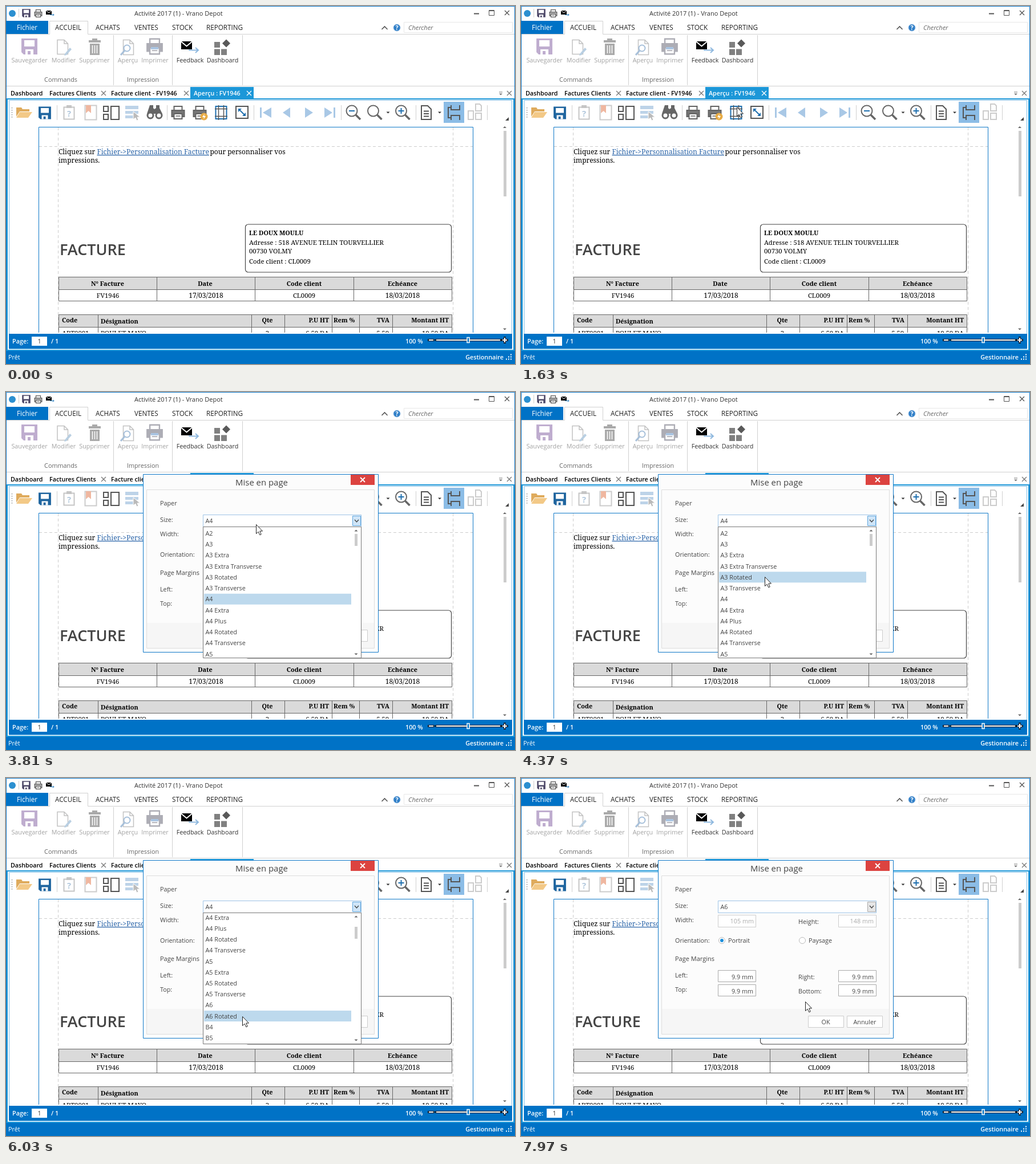
These frames come from a looping animation (892x628 px, 8 s). An HTML page:

```html
<!DOCTYPE html>
<html lang="fr">
<head>
<meta charset="utf-8">
<title>Mise en page</title>
<style>
html, body { margin: 0; width: 100%; height: 100%; overflow: hidden; background: #fff; }
svg { display: block; width: 100%; height: 100%; }
text { font: 10.8px "Open Sans", sans-serif; fill: #333; white-space: pre; }
.tab text { font-size: 11.7px; fill: #222; }
.doc text { font-size: 10.7px; font-weight: 600; fill: #000; }
.off text { fill: #a3a3a3; }
.mid text, text.mid { text-anchor: middle; }
.end text, text.end { text-anchor: end; }
.inv text { fill: #fff; }
.inv .b { font-weight: 600; }
.serif text { font-family: "Noto Serif", serif; font-size: 11.3px; fill: #000; }
.serif .big { font-size: 12px; }
.serif .b text, .serif text.b { font-weight: 700; font-size: 10.9px; }
.dlg text { fill: #444; }
.dlg .dim { fill: #aaa; }
.line { fill: none; stroke: #d0d0d0; }
.dk { fill: none; stroke: #555; stroke-width: 2; }
.bl { fill: none; stroke: #1f6fae; stroke-width: 2; }
.box { fill: #fff; stroke: #bbb; }
</style>
</head>
<body>
<svg viewBox="0 0 892 628">
<defs>
  <clipPath id="view"><rect x="6" y="211" width="863" height="362"/></clipPath>
  <clipPath id="listClip"><rect x="346" y="238" width="276" height="228"/></clipPath>
  <path id="x" d="M-4-4 4 4M4-4-4 4" fill="none"/>
  <path id="down" d="M-3-1.5H3L0 1.5Z"/>
  <g id="floppy"><path d="M-14-14H14V14H-10L-14 10Z"/><path d="M-9-11H9V0H-9ZM-7 5H7V14H2V8H-3V14H-7Z" fill="#fff"/></g>
  <g id="printer" stroke-width="2"><path d="M-7-4V-11H7V-4" fill="#fff"/><path d="M-11-4H11V7H-11Z"/><path d="M-7 2H7V11H-7Z" fill="#fff"/><path d="M-4 6H4" stroke-width="1.500"/></g>
  <g id="lens"><circle r="9.500" fill="#fff"/><path d="M7 7 15 15" stroke-width="3.500"/></g>
  <path id="zoom" d="M741 586H749M754 586H866M870 586H878M874 582V590" fill="none"/>
</defs>
<path d="M.5 628V.5H891.500V628" fill="#fff" stroke="#0f78c8"/>

<!-- title bar -->
<circle cx="11" cy="13" r="6" fill="#2b8fd0"/>
<path class="line" d="M22.500 5V20" stroke="#999"/>
<use href="#floppy" transform="translate(35.500 12.500) scale(.52)" fill="#4d4868"/>
<use href="#printer" transform="translate(56.500 13) scale(.58)" stroke="#555" fill="#bbb"/>
<path d="M70 8H80V15H70Z"/><path d="M70 8 75 12 80 8" fill="none" stroke="#fff"/><path d="M77 15.500H84M82 13.500 84 15.500 82 17.500" fill="none" stroke="#2b7fc0"/>
<text x="225" y="16.500" style="font-size:11px">Activité 2017 (1) - Vrano Depot</text>
<g fill="none" stroke="#555"><path d="M820 13.500H829" stroke-width="2"/><path d="M846.500 7.500H855.500V16.500H846.500Z M846 8.500H856"/><use href="#x" x="878" y="12" stroke-width="1.400"/></g>

<!-- ribbon -->
<path d="M0 26H74V49H0Z" fill="#0072c6"/>
<path class="line" d="M1 49.500H76.500V26.500H143.500V49.500H891M1 140.500H891M188.500 51V139M291.500 51V139M414.500 51V139"/>
<g class="tab"><text x="19" y="42" style="fill:#fff">Fichier</text><text x="86" y="42">ACCUEIL</text><text x="157" y="42">ACHATS</text><text x="225" y="42">VENTES</text><text x="291" y="42">STOCK</text><text x="351" y="42">REPORTING</text></g>
<path d="M658.500 41 663.500 36 668.500 41" fill="none" stroke="#555" stroke-width="1.600"/>
<circle cx="685" cy="38" r="6" fill="#2f7fc8" stroke="#9cc0e4"/><text class="mid" x="685" y="42" style="fill:#fff;font-weight:700">?</text>
<path d="M697.500 28.500H887.500V46.500H697.500Z" fill="none" stroke="#e8e8e8"/>
<text x="705" y="42" style="font-style:italic;font-size:11px;fill:#666">Chercher</text>
<g class="mid off">
  <text x="41" y="99">Sauvegarder</text><text x="101" y="99">Modifier</text><text x="155" y="99">Supprimer</text><text x="213.500" y="99">Aperçu</text><text x="261" y="99">Imprimer</text>
</g>
<g class="mid"><text x="322.500" y="99">Feedback</text><text x="379.500" y="99">Dashboard</text><text x="96" y="133" style="fill:#666">Commands</text><text x="240" y="133" style="fill:#666">Impression</text></g>
<use href="#floppy" x="41" y="71" fill="#bfadcf"/>
<path d="M90 59.500H102L108.500 66V84.500H90Z M102 60V66H108" fill="#fff" stroke="#c2c2c2" stroke-width="1.500"/><path d="M103 84 112 73 115 76 106 86 102 87Z" fill="#b9cfe2"/>
<path d="M145 60H166V64H145ZM151 57H160V60H151ZM147 66H164V86H147Z" fill="#aaa"/><path d="M151.500 69V83M155.500 69V83M159.500 69V83" stroke="#fff" stroke-width="1.500"/>
<path d="M205.500 59.500H217L223.500 66V85.500H205.500Z M217 60V66H223" fill="#fff" stroke="#c2c2c2" stroke-width="1.500"/><circle cx="212" cy="74" r="5.500" fill="#fff" stroke="#a7c0da" stroke-width="2"/><path d="M208 78 201 86" stroke="#a7c0da" stroke-width="3"/>
<use href="#printer" transform="translate(260.500 71) scale(1.200)" stroke="#adadb5" fill="#adadb5"/><path d="M254 72H267V76H254Z" fill="#a9c4e2"/>
<path d="M307 62H326V76H307Z"/><path d="M307 62.500 316.500 70.500 326 62.500" fill="none" stroke="#fff" stroke-width="1.800"/><path d="M320 77.500H337M332 73 337 77.500 332 82" fill="none" stroke="#8fb9df" stroke-width="2"/>
<path d="M365 63H375V73H365ZM365 75.500H375V86H365ZM377 75.500H387V86H377Z" fill="#808080"/><path d="M386 58.500 393 65.500 386 72.500 379 65.500Z" fill="#595959"/>

<!-- document tabs -->
<path d="M323 142H434V163H323Z" fill="#1c97d8"/>
<g class="doc"><text x="8" y="157">Dashboard</text><text x="76" y="157">Factures Clients</text><text x="184" y="157">Facture client - FV1946</text><text x="329" y="157" style="fill:#fff">Aperçu : FV1946</text></g>
<g stroke="#777" stroke-width="1.300"><use href="#x" x="171" y="153"/><use href="#x" x="316" y="153"/><use href="#x" x="426" y="153" stroke="#fff"/><use href="#x" x="882" y="153"/></g>
<path d="M864 151H870" stroke="#777"/><use href="#down" x="867" y="155" fill="#777"/>
<path d="M2 163H890V604H2Z" fill="#fff" stroke="#1c97d8" stroke-width="2"/>
<path d="M5.500 165.500H886.500V601.500H5.500Z" fill="none" stroke="#7dbde6"/>

<!-- toolbar -->
<path class="line" d="M89.500 174V200M282.500 174V200M434.500 174V200M587.500 174V200M718.500 174V200M843.500 174V200" stroke="#ddd"/>
<path d="M10.500 178V197" stroke="#aaa" stroke-dasharray="1.500 2.500" stroke-width="2"/>
<path d="M18 178H27L29 181H41V185H24L18 194Z" fill="#dfab5d"/><path d="M24 186H46L39 196H18Z" fill="#f3c987"/>
<use href="#floppy" transform="translate(68 187.500) scale(.78)" fill="#1f659f"/>
<path d="M101.500 177.500H119.500V198.500H101.500Z" fill="#fff" stroke="#c5c5c5" stroke-width="2"/><path d="M106 174H115V179H106Z" fill="#c5c5c5"/><text class="mid" x="110.500" y="194" style="font-size:15px;font-weight:700;fill:#b3c9dd">?</text>
<path d="M138.500 174.500H158.500V199.500H138.500Z" fill="#fff" stroke="#ccc" stroke-width="2"/><path d="M140 174H149V188L144.500 184 140 188Z" fill="#efb7a0"/>
<path class="dk" d="M171 176H179V185H171ZM171 190H179V199H171ZM184 176H198V199H184Z"/>
<path d="M209 175H232V181H209ZM209 184H232V189H209ZM209 192H224V197H209Z" fill="#bdd3e8"/><path d="M223 185V199L227 196 229 201 232 200 230 195H235Z" fill="#bbb" stroke="#fff"/>
<g fill="#666"><path d="M252 174H258V179L260 181 263 179V174H269V179L274 189H247Z"/><circle cx="253" cy="192" r="6.500"/><circle cx="268" cy="192" r="6.500"/></g><circle cx="253" cy="192" r="3.500" fill="#fff"/><circle cx="268" cy="192" r="3.500" fill="#fff"/>
<g stroke="#636363" fill="#777"><use href="#printer" x="301.500" y="187"/><use href="#printer" x="339.500" y="187"/></g><circle cx="347" cy="194" r="6.500" fill="#e7ab45"/><path d="M348 189 344 195H347L346 199 350 193H347Z" fill="#fff"/>
<rect id="hot" x="358" y="168" width="37" height="37"/>
<path d="M367.500 176H386.500V198H367.500Z" fill="#fff" stroke="#1f6fae" stroke-width="2"/><path d="M372.500 174V200M381.500 174V200M366 180.500H388M366 193.500H388" stroke="#555" stroke-width="1.500"/>
<path d="M403 176H424V197H403Z" fill="#fff" stroke="#555" stroke-width="2"/><path d="M407 180H413L407 186ZM420 193H414L420 187Z" fill="#1f6fae"/><path class="bl" d="M409 182 418 191"/>
<g fill="#a9c8e6"><path d="M445 178H448V196H445ZM465 178V196L450 187ZM498 178V196L485 187ZM524 178V196L538 187ZM558 178V196L572 187ZM574 178H577V196H574Z"/></g>
<g stroke="#666" stroke-width="2"><use href="#lens" x="606" y="184"/><use href="#lens" x="643.500" y="184"/><use href="#lens" x="692.500" y="184"/></g>
<path class="bl" d="M601 184H611M687.500 184H697.500M692.500 179V189"/>
<use href="#down" x="669.500" y="187" fill="#333"/><use href="#down" x="760" y="187" fill="#333"/>
<path class="dk" d="M728 175H739L745 181V199H728ZM732 184.500H741M732 189H741M732 193.500H741"/>
<path d="M767 168H803V205H767Z" fill="#8bbce6"/>
<path class="dk" d="M780 174V182H795V174M780 200V192H795V200M779 178H775V196H779"/>
<path d="M810 184H819V199H810ZM823 172H830L833 175V184H823ZM823 188H833V199H823Z" fill="#fff" stroke="#ccc" stroke-width="2"/>
<path d="M881 195V201H875Z" fill="#444"/>

<!-- preview page -->
<g clip-path="url(#view)">
  <path d="M57.500 212.500H818.500V590H57.500Z" fill="#fff" stroke="#0f78c8"/>
  <path d="M58 246.500H818M91.500 213V575M783.500 213V575" fill="none" stroke="#ccc" stroke-dasharray="5 4"/>
  <g class="serif">
    <text class="big" x="92" y="260">Cliquez sur <tspan x="159.500" font-size="12.200" fill="#2a64a8" text-decoration="underline">Fichier-&gt;Personnalisation Facture</tspan><tspan x="357.500">pour personnaliser vos</tspan></text>
    <text class="big" x="92" y="275">impressions.</text>
    <rect x="419.500" y="383" width="361" height="84" rx="5" fill="#fff" stroke="#444" stroke-width="1.200"/>
    <text class="b" x="426" y="402">LE DOUX MOULU</text>
    <text x="426" y="419">Adresse : 518 AVENUE TELIN TOURVELLIER</text>
    <text x="426" y="434">00730 VOLMY</text>
    <text x="426" y="452">Code client : CL0009</text>
    <path d="M92 476H781V497H92ZM92 541H781V563H92Z" fill="#dadada"/>
    <path d="M92.500 475.500H781.500V517.500H92.500ZM92 497.500H781M264.500 476V518M436.500 476V518M609.500 476V518M92.500 580V541.500H781.500V580M92 563.500H781M161.500 541V580M430.500 541V580M488.500 541V580M571.500 541V580M619.500 541V580M677.500 541V580" fill="none" stroke="#666"/>
    <g class="mid b"><text x="178" y="491">N° Facture</text><text x="349" y="491">Date</text><text x="522.500" y="491">Code client</text><text x="695" y="491">Echéance</text><text x="458" y="555">Qte</text></g>
    <g class="mid"><text x="178.500" y="512">FV1946</text><text x="350.500" y="512" class="big">17/03/2018</text><text x="522.500" y="512">CL0009</text><text x="695" y="512" class="big">18/03/2018</text><text x="458" y="578">2</text></g>
    <g class="b"><text x="98" y="555">Code</text><text x="166" y="557">Désignation</text><text x="574" y="555">Rem %</text></g>
    <g class="end b"><text x="566" y="555">P.U HT</text><text x="672" y="555">TVA</text><text x="776" y="555">Montant HT</text></g>
    <text x="98" y="578">ART0001</text><text x="166" y="578">POULET MAYO</text>
    <g class="end"><text x="566" y="578">6.50 DA</text><text x="671" y="578">5.50</text><text x="776" y="578">10.50 DA</text></g>
  </g>
  <text x="94" y="437" style="font-size:27px;font-weight:600;fill:#444">FACTURE</text>
</g>
<path d="M872 219H877V334H872Z" fill="#ccc"/><path d="M871 214H877L874 211Z" fill="#666"/><use href="#down" x="874" y="567" fill="#666"/>

<!-- bottom bars -->
<path d="M5 575H887V601H5ZM0 605H892V628H0Z" fill="#0072c6"/>
<g class="inv"><text class="b" x="11" y="592">Page:</text><text class="b" x="79" y="592">/ 1</text><text class="b" x="700" y="592">100 %</text><text x="4" y="620">Prêt</text><text class="end b" x="872" y="620">Gestionnaire</text></g>
<path d="M45 580H72V596H45Z" fill="#fff"/><text class="mid" x="58.500" y="592">1</text>
<use href="#zoom" stroke="#123" stroke-width="4" stroke-linecap="square"/><use href="#zoom" stroke="#fff" stroke-width="2"/>
<path d="M808 581.500H812V590.500H808Z" fill="#0072c6" stroke="#fff" stroke-width="1.500"/>
<path d="M876 619.500H886M880 615.500H886M884 611.500H886" stroke="#fff" stroke-width="2" stroke-dasharray="2"/>

<!-- tooltip -->
<g id="tip"><path d="M378.500 196.500H610.500V238.500H378.500Z" fill="#fff" stroke="#aaa"/><text x="387" y="213" style="font-size:10.600px;font-weight:600">Mise en page...</text><text x="387" y="230" style="font-size:10.900px;fill:#555">Ajuster les paramètres du document page.</text></g>

<!-- dialog -->
<g id="dialog" class="dlg">
  <path d="M240.500 144.500H652.500V456.500H240.500Z" fill="#fcfcfc" stroke="#0f78c8"/>
  <path d="M246.500 171.500H645.500V449.500H246.500Z" fill="#fcfcfc" stroke="#ddd"/><path d="M247 405H645V449H247Z" fill="#f6f6f6"/>
  <text class="mid" x="448" y="164" style="font-size:14.900px">Mise en page</text>
  <path d="M604 145H646V163H604Z" fill="#dc4340"/><use href="#x" x="625" y="154" stroke="#fff" stroke-width="1.800"/>
  <text x="270" y="199">Paper</text><text x="270" y="228">Size:</text><text x="270" y="253">Width:</text><text x="486" y="256">Height:</text>
  <text x="270" y="289">Orientation:</text><text x="363" y="289">Portrait</text><text x="504" y="289">Paysage</text><text x="270" y="321" style="font-size:11px">Page Margins</text>
  <text x="270" y="350">Left:</text><text x="270" y="375">Top:</text><text x="486" y="353">Right:</text><text x="486" y="378">Bottom:</text>
  <path class="box" d="M345.500 215.500H622.500V236.500H345.500Z" style="stroke:#9dc3e6"/>
  <path id="drop" d="M607.500 217.500H621.500V234.500H607.500Z"/><path d="M611 224 614.500 228 618 224" fill="none" stroke="#444" stroke-width="1.300"/>
  <text id="size" x="349.500" y="230"></text>
  <path class="box" d="M345.500 240.500H411.500V261.500H345.500ZM556.500 240.500H622.500V261.500H556.500Z" style="stroke:#ccc"/>
  <path class="box" d="M345.500 337.500H411.500V357.500H345.500ZM345.500 362.500H411.500V382.500H345.500ZM556.500 337.500H622.500V357.500H556.500ZM556.500 362.500H622.500V382.500H556.500Z" style="stroke:#aaa"/>
  <g class="end"><text id="wide" class="dim" x="408" y="255"></text><text id="high" class="dim" x="618" y="255"></text><text x="407" y="352.500">9.9 mm</text><text x="407" y="377.500">9.9 mm</text><text x="618" y="352.500">9.9 mm</text><text x="618" y="377.500">9.9 mm</text></g>
  <circle class="box" cx="352" cy="285" r="5.500"/><circle cx="352" cy="285" r="3" fill="#1b8fdc"/><circle class="box" cx="493" cy="285" r="5.500"/>
  <path class="box" d="M503.500 417.500H565.500V437.500H503.500ZM571.500 417.500H633.500V437.500H571.500Z" style="stroke:#ccc"/>
  <g class="mid"><text x="534" y="432">OK</text><text x="602.500" y="432">Annuler</text></g>
</g>

<!-- size list -->
<g id="popup" class="dlg">
  <path d="M345.500 236.500H622.500V466.500H345.500Z" fill="#fff" stroke="#777"/>
  <g clip-path="url(#listClip)"><g id="list"><rect id="sel" x="347" width="258" height="19"/><rect id="hover" x="347" width="258" height="19" fill="#cfe6f7"/></g></g>
  <path d="M610.500 244.500H616.500L613.500 241.500Z" fill="#666"/><use href="#down" x="613.500" y="460" fill="#666"/>
  <rect id="thumb" x="611" width="5" height="21" fill="#ccc"/>
</g>
<path id="cursor" d="M.5.5V16.500L4.200 13.200 6.800 18.800 9.200 17.800 6.800 12H11.500Z" fill="#fff" stroke="#222" stroke-linejoin="round"/>
</svg>
<script>
const $ = id => document.getElementById(id);
const LOOP = 8000, PITCH = 19.23, TOP = 238.4;
const sizes = ["A2", "A3", "A3 Extra", "A3 Extra Transverse", "A3 Rotated", "A3 Transverse", "A4", "A4 Extra", "A4 Plus",
  "A4 Rotated", "A4 Transverse", "A5", "A5 Extra", "A5 Rotated", "A5 Transverse", "A6", "A6 Rotated", "B4", "B5"];
sizes.forEach((name, i) => {
  const t = document.createElementNS("http://www.w3.org/2000/svg", "text");
  t.setAttribute("x", 349.5);
  t.setAttribute("y", 252 + i * PITCH);
  t.textContent = name;
  $("list").append(t);
});

// Cursor moves: first step, last step, step count, target, ease-out power
const home = [887, 718];
const moves = [
  [70, 540, 8, 382, 181, 1.6], [710, 710, 1, 378, 177, 1], [2290, 2290, 1, 386, 189, 1],
  [2450, 2630, 3, 412, 198, 1], [2690, 2890, 4, 429, 211, 1.4], [3280, 3280, 1, 429, 220, 1],
  [3530, 3530, 1, 438, 232, 1], [4220, 4530, 5, 417, 413, 1.4], [6030, 6030, 1, 414, 418, 1],
  [6100, 6170, 2, 408, 398, 1], [7270, 7480, 4, 378, 221, 1], [7550, 7970, 6, 498, 392, 1.3]
];

function cursorAt(t) {
  let [x, y] = home;
  for (const [a, b, n, tx, ty, pow] of moves) {
    if (t < a) break;
    const k = b > a ? Math.min(n, 1 + Math.floor((t - a) / (b - a) * (n - 1))) : n;
    const p = 1 - (1 - k / n) ** pow;
    x += (tx - x) * p;
    y += (ty - y) * p;
  }
  return [Math.round(x), Math.round(y)];
}

const set = (id, key, value) => $(id).setAttribute(key, value);
const between = (t, a, b) => t >= a && t < b;
// Shown from a to b, half faded until the full time
function show(id, t, a, full, b) {
  set(id, "display", between(t, a, b) ? "inline" : "none");
  set(id, "opacity", t < full ? 0.55 : 1);
}

function draw(t) {
  const [x, y] = cursorAt(t);
  set("cursor", "transform", `translate(${x} ${y})`);
  set("hot", "fill", between(t, 540, 1630) ? (t < 1570 ? "#cfe4f6" : "#8fc1ea") : "none");
  show("tip", t, 940, 1010, 1510);
  show("dialog", t, 1810, 1890, LOOP);
  show("popup", t, 3750, 3810, 6720);

  const open = between(t, 3750, 6720), done = t >= 6720;
  set("drop", "fill", open ? "#cfe5f8" : "#e6e6e6");
  set("drop", "stroke", open ? "#5ea6dd" : "#aaa");
  $("size").textContent = done ? "A6" : "A4";
  $("wide").textContent = done ? "105 mm" : "210 mm";
  $("high").textContent = done ? "148 mm" : "297 mm";

  const scroll = 46 * [4850, 5400, 5550].filter(s => t >= s).length;
  const under = Math.floor((y + scroll - TOP) / PITCH);
  const wheeled = between(t, 4850, 6030);
  const sel = wheeled ? 9 : t < 4220 || under < 0 ? 6 : under;
  const rowY = i => TOP + i * PITCH;
  set("list", "transform", `translate(0 ${-scroll})`);
  set("sel", "y", rowY(sel));
  set("sel", "fill", t >= 6560 ? "#a9cfec" : "#bdd9ed");
  set("hover", "y", rowY(under));
  set("hover", "display", wheeled ? "inline" : "none");
  set("thumb", "y", 249 + scroll * 0.087);
}

const start = performance.now();
function tick() {
  draw((performance.now() - start) % LOOP);
  requestAnimationFrame(tick);
}
tick();
</script>
</body>
</html>
```
